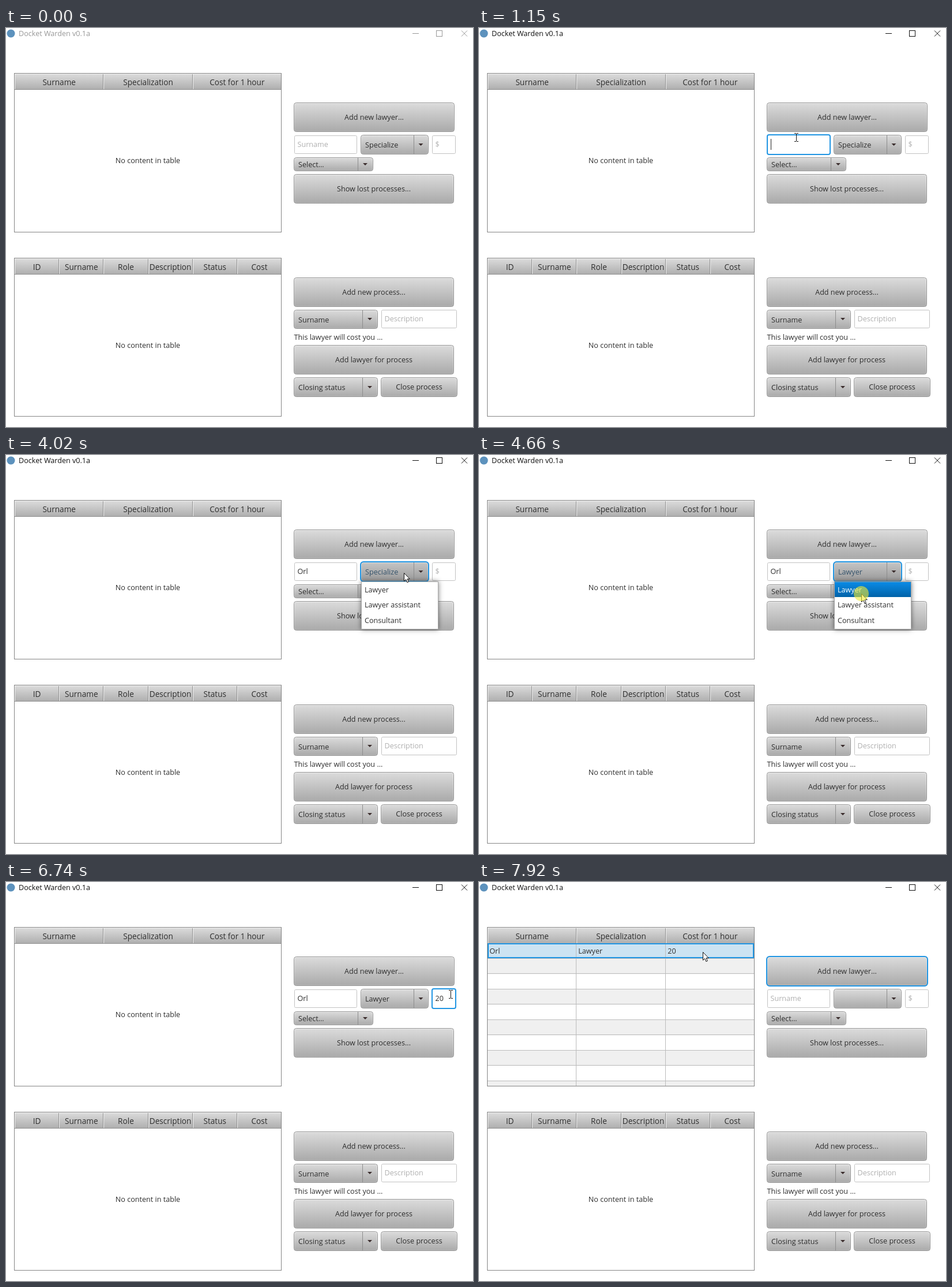
Animation, 810 px wide and 691 px high, one loop 8 s. Source, as an HTML page with a canvas:

```html
<!DOCTYPE html>
<html lang="en">
<head>
<meta charset="utf-8">
<title>Lawyer table</title>
<style>
html, body { margin: 0; width: 100%; height: 100%; overflow: hidden; background: #fff; }
canvas { display: block; }
</style>
</head>
<body>
<canvas id="stage" width="810" height="691"></canvas>
<script>
const ctx = document.getElementById('stage').getContext('2d');
const LOOP = 8000, BLUE = '#2095e3', INK = '#2e2e2e', PROMPT = '#b0b0b0';
const SURNAME = 'Orl', PRICE = '20', ROW = 26.55;

// Pointer keys: time, x, y
const PATH = [
  [380, 690, 543], [1000, 550, 189], [1460, 550, 189], [1470, 550, 190], [3430, 550, 190],
  [3900, 690, 203], [4000, 690, 203], [4260, 665, 240], [4340, 665, 240], [4350, 664, 241],
  [4500, 664, 241], [4510, 663, 240], [4730, 663, 240], [5130, 771, 201], [5570, 771, 201],
  [5580, 771, 202], [6670, 771, 202], [6740, 771, 194], [7080, 743, 142], [7280, 743, 142],
  [7920, 388, 121], [8000, 388, 121]
];
const CLICKS = [[1000, 1150], [3880, 4020], [4660, 4800], [5130, 5270], [7060, 7280]];

const between = (t, a, b) => t >= a && t < b;
const typed = (t, text, times) => text.slice(0, times.filter(at => t >= at).length);

function pointerAt(t) {
  if (t < PATH[0][0]) return null;
  const i = PATH.findIndex(k => k[0] > t);
  const [t0, x0, y0] = PATH[i - 1], [t1, x1, y1] = PATH[i];
  const u = (t - t0) / (t1 - t0), e = u * u * (3 - 2 * u);
  return { x: Math.round(x0 + (x1 - x0) * e), y: Math.round(y0 + (y1 - y0) * e) };
}

const inside = (p, x, y, w, h) => p && p.x >= x && p.x < x + w && p.y >= y && p.y < y + h;

function fill(color, x, y, w, h) {
  ctx.fillStyle = color;
  ctx.fillRect(x, y, w, h);
}

// Text centred vertically on y, with its baseline on a whole pixel
function text(s, x, y, { color = INK, size = 12.6, align = 'left' } = {}) {
  ctx.font = size + 'px "Open Sans", sans-serif';
  ctx.textAlign = align;
  ctx.fillStyle = color;
  ctx.fillText(s, x, Math.round(y + 4.4));
}

function gradient(y, h, top, bottom) {
  const g = ctx.createLinearGradient(0, y, 0, y + h);
  g.addColorStop(0, top);
  g.addColorStop(1, bottom);
  return g;
}

function roundBox(x, y, w, h, r, paint, border, line = 1) {
  ctx.beginPath();
  ctx.roundRect(x, y, w, h, r);
  ctx.fillStyle = paint;
  ctx.fill();
  ctx.strokeStyle = border;
  ctx.lineWidth = line;
  ctx.stroke();
}

function strokePath(color, width, ...lines) {
  ctx.strokeStyle = color;
  ctx.lineWidth = width;
  ctx.beginPath();
  for (const [x0, y0, x1, y1] of lines) {
    ctx.moveTo(x0, y0);
    ctx.lineTo(x1, y1);
  }
  ctx.stroke();
}

function bevel(x, y, w, h, { focus, hover, open }) {
  const [top, bottom] = open ? ['#c6c6c6', '#999'] : hover ? ['#ebebeb', '#b7b7b7'] : ['#dcdcdc', '#a9a9a9'];
  roundBox(x + .5, y + .5, w - 1, h - 1, 4, gradient(y, h, top, bottom), '#939393');
  roundBox(x + 1.5, y + 1.5, w - 3, h - 3, 3, 'transparent', gradient(y, h, '#ffffff77', '#ffffff22'));
  if (focus) roundBox(x, y, w, h, 5, 'transparent', BLUE, 2);
}

function button(label, x, y, w, h, p, focus) {
  bevel(x, y, w, h, { focus, hover: inside(p, x, y, w, h) });
  text(label, x + w / 2, y + h / 2 - .3, { align: 'center' });
}

function combo(label, x, y, w, h, arrow, p, { focus, open } = {}) {
  bevel(x, y, w, h, { focus, open, hover: inside(p, x, y, w, h) });
  strokePath('#8c8c8c', 1, [x + w - arrow + .5, y + 1, x + w - arrow + .5, y + h - 1]);
  text(label, x + 8, y + h / 2 + 1, { color: open ? '#34526a' : INK });
  const cx = x + w - arrow / 2 - .5, cy = Math.round(y + h / 2 - 2.5);
  ctx.fillStyle = '#3a2c2c';
  ctx.beginPath();
  ctx.moveTo(cx - 4, cy);
  ctx.lineTo(cx + 4, cy);
  ctx.lineTo(cx, cy + 4);
  ctx.fill();
}

function field(value, prompt, x, y, w, h, focus, caret) {
  if (focus) roundBox(x, y - 1, w, h + 2, 3, '#fff', BLUE, 2);
  else roundBox(x + .5, y + .5, w - 1, h - 1, 2, '#fff', '#c2c2c2');
  const tx = x + 5.5, cy = y + h / 2;
  if (value) text(value, tx, cy);
  else if (!focus) text(prompt, tx, cy, { color: PROMPT });
  if (caret) {
    ctx.font = '12.6px "Open Sans", sans-serif';
    fill('#222', Math.round(tx + ctx.measureText(value).width), cy - 10, 1, 19);
  }
}

function table(y, h, columns, filled, hover) {
  const x = 14, w = 464, step = (w - 1) / columns.length;
  const edges = columns.map((_, i) => Math.round(x + step * i) + .5);
  if (filled) {
    const top = y + 28;
    ctx.save();
    ctx.beginPath();
    ctx.rect(x, top, w, h - 28);
    ctx.clip();
    for (let i = 0; i < 10; i++) {
      const ry = Math.round(top + i * ROW);
      if (i % 2) fill('#f0f0f0', x, ry, w, ROW);
      strokePath('#bcbcbc', 1, [x, ry - .5, x + w, ry - .5]);
    }
    if (hover) fill('#cce3f2', x, top, w, ROW - 1);
    strokePath('#bcbcbc', 1, ...edges.slice(1).map(e => [e, top, e, y + h]));
    ctx.restore();
  } else {
    text('No content in table', 246, y + 152, { align: 'center' });
  }
  fill(gradient(y, 28, '#dedede', '#afafaf'), x, y, w, 28);
  strokePath('#8e8e8e', 1, ...edges.slice(1).map(e => [e, y, e, y + 28]), [x, y + 28.5, x + w, y + 28.5]);
  strokePath('#f0f0f0', 1, ...edges.map(e => [e + 1, y + 1, e + 1, y + 28]), [x, y + 1.5, x + w, y + 1.5]);
  columns.forEach((name, i) =>
    text(name, x + step * (i + .5) + 1, y + 16.3, { size: 13.6, align: 'center' }));
  ctx.lineWidth = 1;
  ctx.strokeStyle = '#858585';
  ctx.strokeRect(x + .5, y + .5, w - 1, h - 1);
  if (filled) {
    ctx.strokeStyle = BLUE;
    ctx.lineWidth = 2;
    ctx.strokeRect(x + 2, y + 29, w - 4, 24);
    [SURNAME, 'Lawyer', PRICE].forEach((s, i) => text(s, edges[i] + 3.7, y + 41.3));
  }
}

function titleBar(active) {
  const color = active ? '#111' : '#989898';
  ctx.fillStyle = '#5d92bd';
  ctx.beginPath();
  ctx.arc(8.5, 9.5, 7, 0, 7);
  ctx.fill();
  text('Docket Warden v0.1a', 22, 9.5, { color });
  strokePath(color, 1, [705, 9.5, 716, 9.5], [790, 4.5, 800, 14.5], [800, 4.5, 790, 14.5]);
  ctx.strokeRect(746.5, 4.5, 10, 10);
}

function popup(p) {
  ctx.save();
  ctx.shadowColor = '#0008';
  ctx.shadowBlur = 8;
  fill('#fff', 616, 219, 134, 83);
  ctx.restore();
  ctx.strokeStyle = '#a8a8a8';
  ctx.lineWidth = 1;
  ctx.strokeRect(616.5, 219.5, 133, 82);
  ['Lawyer', 'Lawyer assistant', 'Consultant'].forEach((name, i) => {
    const y = 220 + i * 26.5, over = inside(p, 616, y, 134, 26.5);
    if (over) fill(gradient(y, 26, '#0a8be6', '#0062a8'), 617, y, 132, 26);
    text(name, 622, y + 13.3, { color: over ? '#fff' : INK });
  });
}

function pointer({ x, y }, beam, pressed) {
  if (beam) {
    strokePath('#111', 1, [x + .5, y - 6, x + .5, y + 7], [x - 3, y - 6.5, x, y - 6.5],
      [x + 1, y - 6.5, x + 4, y - 6.5], [x - 3, y + 7.5, x, y + 7.5], [x + 1, y + 7.5, x + 4, y + 7.5]);
  } else {
    const outline = [[0, 0], [0, 14], [3.2, 11], [5.4, 16.2], [7.8, 15.2], [5.6, 10.2], [9.8, 10.2]];
    ctx.beginPath();
    outline.forEach(([dx, dy]) => ctx.lineTo(x + .5 + dx, y + .5 + dy));
    ctx.closePath();
    ctx.fillStyle = '#fff';
    ctx.fill();
    ctx.strokeStyle = '#111';
    ctx.lineWidth = 1;
    ctx.stroke();
  }
  if (pressed) {
    ctx.fillStyle = 'rgba(240, 235, 50, .6)';
    ctx.beginPath();
    ctx.arc(x, y, 13, 0, 7);
    ctx.fill();
  }
}

function draw(t) {
  const p = pointerAt(t), added = t >= 7280, open = between(t, 3950, 4730);
  const focus = t < 1000 ? '' : t < 3880 ? 'name' : t < 5130 ? 'role' : t < 7060 ? 'price' : 'add';
  const name = added ? '' : typed(t, SURNAME, [2400, 2630, 2780]);
  const price = added ? '' : typed(t, PRICE, [5980, 6130]);
  const role = added ? '' : t < 4660 ? 'Specialize' : 'Lawyer';
  const nameCaret = between(t, 1000, 1620) || between(t, 2180, 3260);
  const priceCaret = between(t, 5130, 5810) || between(t, 5980, 6590);

  fill('#fff', 0, 0, 810, 691);
  titleBar(t >= 1000);
  table(78, 276, ['Surname', 'Specialization', 'Cost for 1 hour'], added, inside(p, 14, 106, 463, ROW));
  table(398, 275, ['ID', 'Surname', 'Role', 'Description', 'Status', 'Cost']);

  button('Add new lawyer...', 499, 129, 279, 51, p, focus === 'add');
  field(name, 'Surname', 500, 186, 109, 32, focus === 'name', nameCaret);
  combo(role, 615, 185, 118, 34, 26, p, { focus: focus === 'role', open });
  field(price, '$', 739, 186, 41, 32, focus === 'price', priceCaret);
  combo('Select...', 499, 224, 138, 24, 27, open ? null : p);
  button('Show lost processes...', 499, 253, 278, 51, open ? null : p);

  button('Add new process...', 499, 432, 278, 51, p);
  combo('Surname', 499, 488, 146, 33, 27, p);
  field('', 'Description', 651, 488, 131, 32);
  text('This lawyer will cost you ...', 499.5, 536);
  button('Add lawyer for process', 499, 549, 278, 51, p);
  combo('Closing status', 499, 605, 146, 34, 27, p);
  button('Close process', 650, 605, 133, 34, p);

  if (open) popup(p);
  if (p) {
    const beam = inside(p, 500, 186, 109, 32) || inside(p, 739, 186, 41, 32) || inside(p, 651, 488, 131, 32);
    pointer(p, beam, CLICKS.some(([a, b]) => between(t, a, b)));
  }
}

const start = performance.now();
function tick() {
  draw((performance.now() - start) % LOOP);
  requestAnimationFrame(tick);
}
tick();
</script>
</body>
</html>
```
